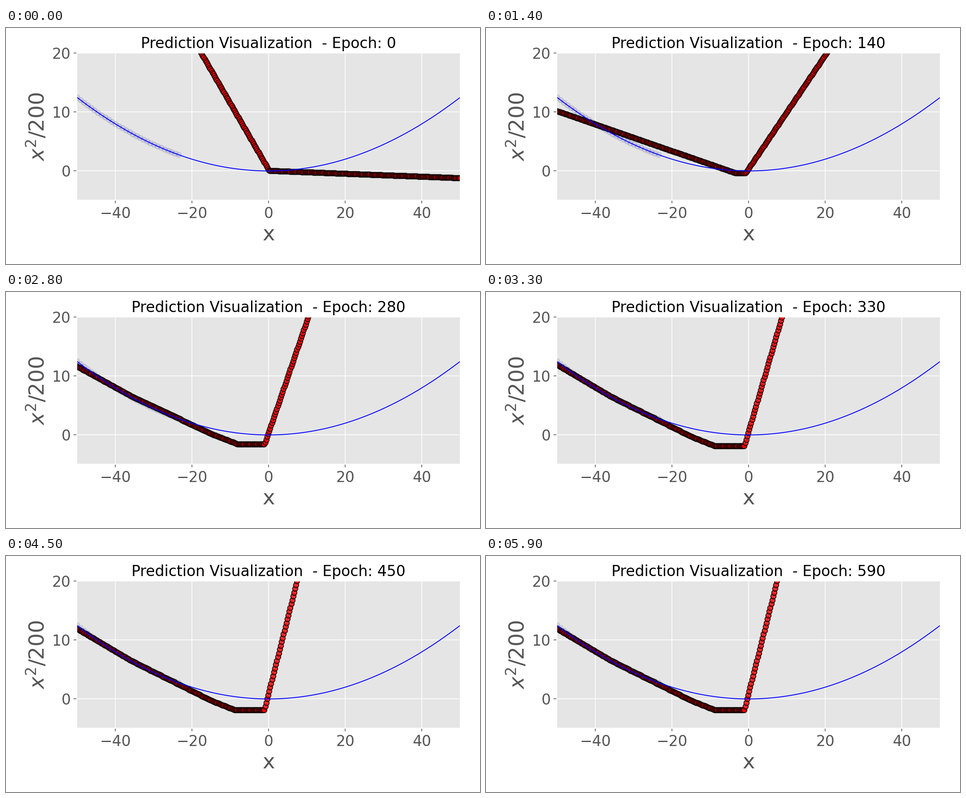
These frames come from a looping animation (1058x529 px, 6000 ms). A matplotlib script:

```python
import numpy as np
import matplotlib.pyplot as plt
from matplotlib.animation import FuncAnimation

W, H, DPI = 1058, 529, 140
FRAMES, INTERVAL = 60, 100
GREY = "#555555"

plt.rcParams.update({
    "font.family": "DejaVu Sans",
    "axes.facecolor": "#E5E5E5",
    "axes.edgecolor": "white",
    "axes.linewidth": 1,
    "axes.labelcolor": GREY,
    "axes.axisbelow": True,
    "grid.color": "white",
    "grid.linestyle": "-",
    "grid.linewidth": 0.8,
    "xtick.color": GREY,
    "ytick.color": GREY,
})


def relu(v):
    return np.maximum(v, 0)


def ramp(v, start, end):
    return np.clip((v - start) / (end - start), 0, 1)


def parabola(v):
    return v ** 2 / 200


def predict(v, epoch):
    """Sum of hinges: a floor, a left arm that bends and a right arm."""
    drop = np.exp(-0.09 * epoch)
    settle = ramp(epoch, 60, 140)
    bend = ramp(epoch, 140, 310)
    climb = ramp(epoch, 140, 380)

    floor = -0.05 + 0.1 * drop - 0.28 * settle - 1.5 * bend
    left = -0.5 + 0.65 * drop - 3 * settle - 5.5 * bend
    right = -0.5 + 0.65 * drop - 0.25 * settle - 0.35 * bend
    left_slope = 0.2 + 0.925 * drop + 0.026 * settle + 0.034 * bend
    right_slope = 0.902 - 0.927 * drop + 0.063 * settle + 1.605 * climb

    curve = bend * (0.065 * relu(-15 - v) + 0.06 * relu(-36 - v))
    return (floor + curve + left_slope * relu(left - v)
            + right_slope * relu(v - right))


# The tiny margin keeps the pixel size from rounding down
fig = plt.figure(figsize=((W + 1e-4) / DPI, (H + 1e-4) / DPI), dpi=DPI,
                 facecolor="white")
ax = fig.add_axes([0.1496, 0.2695, 0.8088, 0.6240])
ax.set_xlim(-50, 50)
ax.set_ylim(-5, 20)
ax.set_xticks(range(-40, 41, 20))
ax.set_yticks([0, 10, 20])
ax.tick_params(labelsize=17)
ax.grid(True)
ax.set_xlabel("x", fontsize=24)
ax.set_ylabel("$x^2/200$", fontsize=24)
title = ax.set_title("", fontsize=17)

x = np.linspace(-50, 50, 400)
x_train = np.linspace(-50, -23.5, 30)
dots = dict(s=36, edgecolors="black", linewidths=1)
ax.scatter(x_train, parabola(x_train), color="blue", alpha=0.1, **dots)
fit = ax.scatter(x, predict(x, 0), color="red", alpha=0.8, **dots)
ax.plot(x, parabola(x), color="blue", lw=1)


def update(i):
    epoch = 10 * i
    fit.set_offsets(np.column_stack([x, predict(x, epoch)]))
    title.set_text(f"Prediction Visualization  - Epoch: {epoch}")
    return fit, title


anim = FuncAnimation(fig, update, frames=FRAMES, interval=INTERVAL,
                     repeat=True, repeat_delay=0)
plt.show()
```
